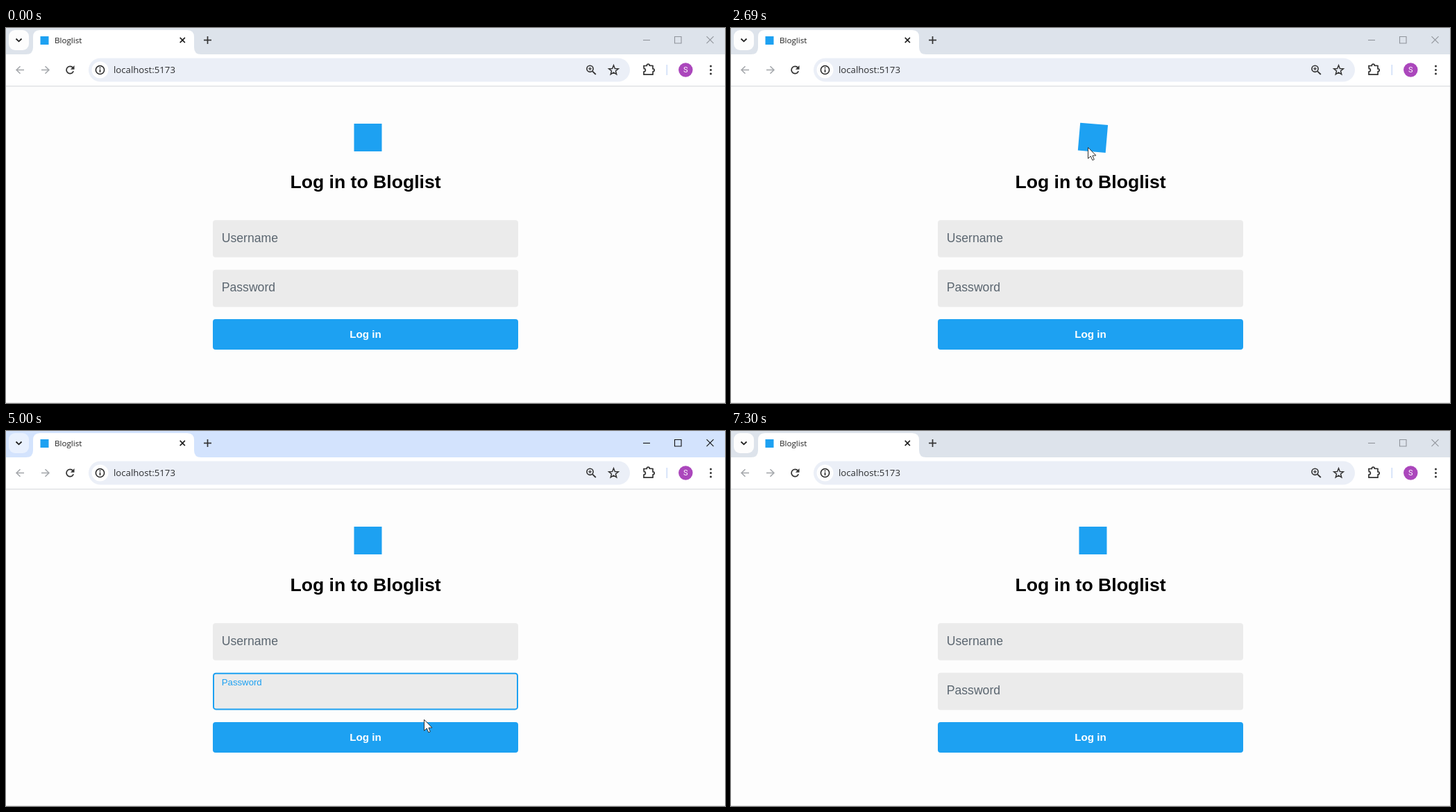
An HTML page with a canvas that plays this animation: 1036x541 px, repeating every 7370 ms.

```html
<!DOCTYPE html>
<html lang="en">
<head>
<meta charset="utf-8">
<title>Bloglist</title>
<style>
html, body { margin: 0; width: 100%; height: 100%; overflow: hidden; background: #fdfdfd; }
canvas { display: block; width: 1036px; height: 541px; }
</style>
</head>
<body>
<canvas id="stage"></canvas>
<script>
const W = 1036, H = 541, LOOP = 7370;
const BLUE = '#1da1f2', DARK = '#1f1f1f', GREY = '#a5a8ac';
const SANS = '"Liberation Sans", Arial, sans-serif';
const UI = '"Open Sans", "Noto Sans", sans-serif';

const canvas = document.getElementById('stage');
const ctx = canvas.getContext('2d');
const dpr = window.devicePixelRatio || 1;
canvas.width = W * dpr;
canvas.height = H * dpr;

// Timeline in ms
const CLICK_USER = 3095, CLICK_PASS = 4195, CLICK_AWAY = 6140, INACTIVE = 7300;
const BLINK = 530, FLOAT = 215, PRESS = 150;
const CLICKS = [[CLICK_USER, 559, 302], [CLICK_PASS, 583, 369], [CLICK_AWAY, 612, 494]];

const SPIN = [[640, 0], [1020, -65], [1570, -174], [2690, -355], [2740, -360]];
const POINTER = [
  [330, 987, 530], [640, 552, 196], [900, 514, 172], [2700, 514, 172],
  [3010, 560, 303], [3600, 560, 303], [4100, 583, 370], [4700, 583, 370],
  [5000, 602, 416], [5270, 608, 440], [5770, 608, 440], [5880, 612, 479],
  [6030, 612, 494], [6640, 612, 494], [6890, 858, 545]
];

const FIELDS = [
  { label: 'Username', y: 277.2, from: CLICK_USER, to: CLICK_PASS },
  { label: 'Password', y: 348.8, from: CLICK_PASS, to: CLICK_AWAY }
];
const BOX = { x: 298, w: 440, h: 53.6 };
const BUTTON = { y: 420, h: 44 };

const clamp = v => Math.max(0, Math.min(1, v));
const mix = (a, b, k) => a + (b - a) * k;
const ease = k => k * k * (3 - 2 * k);

// Linear interpolation through rows of [time, ...values]
function along(keys, t) {
  let i = 0;
  while (i < keys.length - 2 && t >= keys[i + 1][0]) i++;
  const a = keys[i], b = keys[i + 1];
  const k = clamp((t - a[0]) / (b[0] - a[0]));
  return a.slice(1).map((v, n) => mix(v, b[n + 1], k));
}

function fillBox(x, y, w, h, r, color) {
  ctx.fillStyle = color;
  ctx.beginPath();
  ctx.roundRect(x, y, w, h, r);
  ctx.fill();
}

function disc(x, y, r, color) {
  ctx.fillStyle = color;
  ctx.beginPath();
  ctx.arc(x, y, r, 0, Math.PI * 2);
  ctx.fill();
}

function ring(x, y, r, color, width) {
  ctx.beginPath();
  ctx.arc(x, y, r, 0, Math.PI * 2);
  stroke(color, width);
}

function stroke(color, width) {
  ctx.strokeStyle = color;
  ctx.lineWidth = width;
  ctx.stroke();
}

function line(color, width, ...points) {
  ctx.beginPath();
  points.forEach(([x, y]) => ctx.lineTo(x, y));
  stroke(color, width);
}

function cross(x, y, r, color, width) {
  line(color, width, [x - r, y - r], [x + r, y + r]);
  line(color, width, [x - r, y + r], [x + r, y - r]);
}

function text(str, x, y, font, color, align = 'left') {
  ctx.font = font;
  ctx.fillStyle = color;
  ctx.textAlign = align;
  ctx.fillText(str, x, y);
}

function drawTabs(active) {
  ctx.fillStyle = active ? '#d3e3fd' : '#dde3eb';
  ctx.fillRect(0, 0, W, 38);
  fillBox(4, 3, 29, 29, 9, active ? '#e9f1fe' : '#fdfdfd');
  line(DARK, 1.8, [14.5, 15.5], [18.5, 19.3], [22.5, 15.5]);

  // Tab with flared feet
  ctx.fillStyle = '#fff';
  ctx.beginPath();
  ctx.moveTo(29, 38);
  ctx.quadraticCurveTo(39, 38, 39, 28);
  ctx.lineTo(39, 13);
  ctx.quadraticCurveTo(39, 3, 49, 3);
  ctx.lineTo(261, 3);
  ctx.quadraticCurveTo(271, 3, 271, 13);
  ctx.lineTo(271, 28);
  ctx.quadraticCurveTo(271, 38, 281, 38);
  ctx.fill();

  fillBox(49.5, 12, 12, 12, 0, BLUE);
  text('Bloglist', 70, 22.3, `11.6px ${UI}`, DARK);
  cross(254.3, 17.5, 3.6, DARK, 1.6);
  line('#333', 1.7, [285, 17.5], [296, 17.5]);
  line('#333', 1.7, [290.5, 12], [290.5, 23]);

  const color = active ? '#111' : '#8f949b';
  line(color, 1.1, [918, 17.5], [928, 17.5]);
  ctx.beginPath();
  ctx.rect(963.5, 12.5, 9.5, 9.5);
  stroke(color, 1.1);
  cross(1014.5, 17.2, 5, color, 1.1);
}

function drawArrowIcon(x, dir) {
  line(GREY, 1.6, [x - 5.5 * dir, 60.5], [x + 5 * dir, 60.5]);
  line(GREY, 1.6, [x, 55.2], [x + 5.4 * dir, 60.5], [x, 65.8]);
}

function drawReload() {
  ctx.beginPath();
  ctx.arc(92.3, 60.5, 5.2, 0.35, Math.PI * 1.78);
  stroke('#333', 1.7);
  ctx.fillStyle = '#333';
  ctx.beginPath();
  ctx.moveTo(98.5, 54);
  ctx.lineTo(98.5, 59.7);
  ctx.lineTo(92.8, 59.7);
  ctx.fill();
}

function drawStar(x, y) {
  ctx.beginPath();
  for (let i = 0; i < 10; i++) {
    const a = -Math.PI / 2 + i * Math.PI / 5, r = i % 2 ? 3.1 : 7.2;
    ctx.lineTo(x + r * Math.cos(a), y + r * Math.sin(a));
  }
  ctx.closePath();
  stroke('#333', 1.5);
}

function drawPuzzle() {
  ctx.beginPath();
  ctx.moveTo(919, 54.5);
  ctx.lineTo(923.3, 54.5);
  ctx.arc(925.3, 54.2, 2, Math.PI, 0);
  ctx.lineTo(932, 54.5);
  ctx.lineTo(932, 58.8);
  ctx.arc(932.2, 60.8, 2, -Math.PI / 2, Math.PI / 2);
  ctx.lineTo(932, 67.2);
  ctx.lineTo(919, 67.2);
  ctx.lineTo(919, 63);
  ctx.arc(919.3, 60.8, 2.1, Math.PI / 2, -Math.PI / 2, true);
  ctx.closePath();
  stroke('#333', 1.7);
}

function drawToolbar() {
  ctx.fillStyle = '#fff';
  ctx.fillRect(0, 38, W, 46);
  ctx.fillStyle = '#dadcdf';
  ctx.fillRect(0, 83.3, W, 1.2);
  drawArrowIcon(20.5, -1);
  drawArrowIcon(56.5, 1);
  drawReload();

  fillBox(119, 43.5, 780, 34, 17, '#ebeff7');
  disc(135.5, 60.5, 12, '#fff');
  ring(135.5, 60.5, 6.1, DARK, 1.5);
  line(DARK, 1.6, [135.5, 59.6], [135.5, 64]);
  disc(135.5, 57.5, 0.95, DARK);
  text('localhost:5173', 155, 65.2, `13.2px ${UI}`, '#2b2d30');

  ring(841.5, 58.8, 4.6, '#333', 1.6);
  line('#333', 1.8, [845, 62.3], [849.8, 67]);
  line('#333', 1.2, [839.2, 58.8], [843.8, 58.8]);
  line('#333', 1.2, [841.5, 56.5], [841.5, 61.1]);
  drawStar(875.5, 61);
  drawPuzzle();
  line('#cfdff8', 1.6, [952.3, 53], [952.3, 68]);
  disc(979.3, 60.5, 10.2, '#ab47bc');
  text('S', 979.3, 64.4, '11px Roboto, sans-serif', '#fff', 'center');
  [55, 60.5, 66].forEach(y => disc(1015.5, y, 1.5, '#333'));
}

function drawLogo(t) {
  const [angle] = along(SPIN, t);
  ctx.save();
  ctx.translate(518, 157.5);
  ctx.rotate(angle * Math.PI / 180);
  fillBox(-16.5, -19.5, 40, 40, 0, BLUE);
  ctx.restore();
}

function drawField(field, t) {
  const { y, from, to, label } = field;
  const focused = t >= from && t < to;
  const k = ease(clamp((t - from) / FLOAT)) - ease(clamp((t - to) / FLOAT));
  fillBox(BOX.x, y, BOX.w, BOX.h, 4, '#ebebeb');
  if (focused) {
    ctx.beginPath();
    ctx.roundRect(BOX.x + 1, y + 1, BOX.w - 2, BOX.h - 2, 3.5);
    stroke(BLUE, 2);
  }
  const color = `rgb(${mix(91, 29, k)}, ${mix(102, 161, k)}, ${mix(112, 242, k)})`;
  text(label, 310.8, y + mix(31.3, 18.4, k), `${mix(17.6, 13.2, k)}px ${SANS}`, color);
  if (focused && Math.floor((t - from) / BLINK) % 2 === 0) {
    ctx.fillStyle = '#000';
    ctx.fillRect(310.7, y + 23, 1.2, 20);
  }
}

function drawPage(t, hover) {
  ctx.fillStyle = '#fdfdfd';
  ctx.fillRect(0, 84, W, H - 84);
  ctx.fillStyle = '#e4e4e4';
  ctx.fillRect(0, 540, W, 1);
  drawLogo(t);
  text('Log in to Bloglist', 518, 231.3, `bold 26.6px ${SANS}`, '#000', 'center');
  FIELDS.forEach(field => drawField(field, t));
  fillBox(BOX.x, BUTTON.y, BOX.w, BUTTON.h, 4, hover ? '#1a91da' : BLUE);
  text('Log in', 518, 447.2, `bold 15.2px ${SANS}`, '#fff', 'center');
}

function drawArrow() {
  ctx.beginPath();
  [[0, 0], [0, 16], [3.8, 12.6], [6.3, 18.4], [8.8, 17.4], [6.4, 11.8], [11.4, 11.6]]
    .forEach(([x, y]) => ctx.lineTo(x + 0.5, y + 0.3));
  ctx.closePath();
  ctx.fillStyle = '#fff';
  ctx.fill();
  stroke('#333', 1);
}

function drawBeam() {
  line('#222', 1.2, [0, -8], [0, 8]);
  [-8.5, 8.5].forEach(y => {
    line('#222', 1.2, [-4, y], [-1, y]);
    line('#222', 1.2, [1, y], [4, y]);
  });
}

function drawHand() {
  ctx.beginPath();
  ctx.moveTo(-1.5, 1);
  ctx.quadraticCurveTo(0, -1, 1.5, 1);
  ctx.lineTo(1.5, 6.5);
  ctx.lineTo(8, 8);
  ctx.quadraticCurveTo(10.5, 9, 10, 12);
  ctx.lineTo(8, 19.5);
  ctx.lineTo(0, 19.5);
  ctx.lineTo(-6, 12);
  ctx.quadraticCurveTo(-5, 9, -1.5, 12);
  ctx.closePath();
  ctx.fillStyle = '#fff';
  ctx.fill();
  stroke('#222', 1);
}

function drawPointer(x, y, shape) {
  ctx.save();
  ctx.translate(x, y);
  shape();
  ctx.restore();
}

function render(t) {
  ctx.setTransform(dpr, 0, 0, dpr, 0, 0);
  const [x, y] = along(POINTER, t);
  const visible = t >= 330 && t < 6890;
  const inside = (top, height) =>
    visible && x >= BOX.x && x <= BOX.x + BOX.w && y >= top && y <= top + height;
  const hover = inside(BUTTON.y, BUTTON.h);
  const typing = FIELDS.some(field => inside(field.y, BOX.h));

  drawPage(t, hover);
  drawTabs(t >= CLICK_USER && t < INACTIVE);
  drawToolbar();
  CLICKS.forEach(([at, cx, cy]) => {
    if (t >= at && t < at + PRESS) disc(cx, cy, 12, 'rgba(250, 245, 30, 0.62)');
  });
  if (visible) drawPointer(x, y, hover ? drawHand : typing ? drawBeam : drawArrow);
}

const start = performance.now();
function tick() {
  render((performance.now() - start) % LOOP);
  requestAnimationFrame(tick);
}
tick();
</script>
</body>
</html>
```
